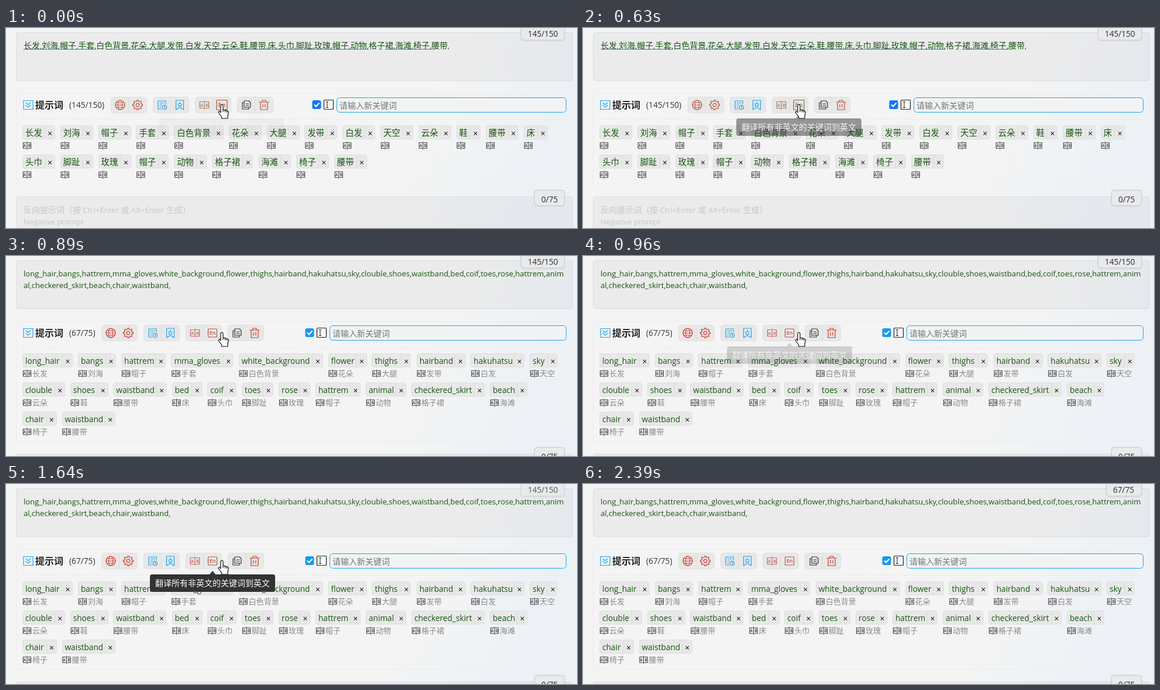
An HTML page that plays this animation: 976 by 343 pixels, repeating every 2990 ms.

```html
<!DOCTYPE html>
<html lang="zh-CN">
<head>
<meta charset="utf-8">
<title>提示词</title>
<style>
  html, body { margin: 0; width: 100%; height: 100%; overflow: hidden; background: #f4f4f4; }
  svg { display: block; width: 976px; height: 343px; }
  text { font-family: "Open Sans", "Noto Sans CJK SC", "Noto Sans CJK", sans-serif; white-space: pre; }
  .line { fill: none; stroke: currentColor; stroke-width: 1.2; stroke-linecap: round; stroke-linejoin: round; }
  .panel { fill: #000; fill-opacity: .037; stroke: #000; stroke-opacity: .075; }
  .box { fill: #e8e8e8; stroke: #dfdfdf; }
</style>
</head>
<body>
<svg id="stage" viewBox="0 0 976 343" xmlns="http://www.w3.org/2000/svg"></svg>
<script>
const LOOP = 2990;
const STEPS = [0, 70, 140, 210, 350, 550, 620, 690, 750, 890, 960, 1030, 1100, 1170, 1240,
  1640, 1710, 1780, 1850, 1920, 1990, 2070, 2320, 2390];
const GREEN = '#17550f', BLUE = '#1fa3ee';

const zhRows = [
  '长发 刘海 帽子 手套 白色背景 花朵 大腿 发带 白发 天空 云朵 鞋 腰带 床',
  '头巾 脚趾 玫瑰 帽子 动物 格子裙 海滩 椅子 腰带'
].map(r => r.split(' '));
const zh = zhRows.flat();
const enRows = [
  'long_hair bangs hattrem mma_gloves white_background flower thighs hairband hakuhatsu sky',
  'clouble shoes waistband bed coif toes rose hattrem animal checkered_skirt beach',
  'chair waistband'
].map(r => r.split(' '));
const chipWidths = [
  [84.9, 64.2, 75.3, 105.3, 142.9, 64.8, 66.3, 82.6, 90.9, 47],
  [71.7, 63.6, 90.2, 50.8, 48.8, 53, 52.9, 76, 68, 124, 63],
  [57.5, 90.2]
];

// Latin runs get their own size next to the CJK glyphs.
const text = (x, y, s, fill, size = 14, latin = size, extra = '') =>
  `<text x="${x}" y="${y}" fill="${fill}" font-size="${size}" ${extra}>` +
  s.replace(/[ -~]+/g, m => `<tspan font-size="${latin}">${m}</tspan>`) + '</text>';
const rect = (x, y, w, h, r, attrs) =>
  `<rect x="${x}" y="${y}" width="${w}" height="${h}" rx="${r}" ${attrs}/>`;
const icon = (x, y, color, body, scale = 1) =>
  `<g transform="translate(${x} ${y}) scale(${scale})" color="${color}" class="line">${body}</g>`;
const path = (d, attrs = '') => `<path d="${d}" ${attrs}/>`;
const letters = (x, y, s, size) =>
  `<text x="${x}" y="${y}" font-size="${size}" font-weight="600" text-anchor="middle" fill="currentColor" stroke="none">${s}</text>`;

const abBody = path('M-1.8-5.5H-7.7V5.5H-1.8M1.8-5.5H7.7V5.5H1.8M0-7.5V7.5') +
  letters(-4.4, 2.8, 'A', 7.5) + letters(4.4, 2.8, 'B', 7.5);
const enBody = rect(-7.5, -7, 15, 14, 1, '') + letters(0, 3.3, 'En', 9);
const globe = '<circle r="8"/><g stroke-width=".9"><ellipse rx="3.6" ry="8"/>' +
  path('M-8 0H8M-7-4H7M-7 4H7') + '</g>';
const history = path('M6-2V-7H-7V7H-1M-4-3.5H3M-4 0H0M-4 3.5H-2') +
  '<circle cx="4" cy="4" r="3.7"/>' + path('M4 2V4.3L5.7 5');
const star = path('M-6.5-8H6.5V8L0 4-6.5 8Z') +
  path('M0-4.5L1.2-2 3.8-1.7 1.9.1 2.4 2.7 0 1.4-2.4 2.7-1.9.1-3.8-1.7-1.2-2Z', 'stroke-width="1"');
const copy = path('M-4-7H4L7-4V4H-4ZM-4-4H-7V7H4V4M-1-2H4M-1 1H4');
const trash = path('M-8-5H8M-3-5V-8H3V-5M-6-5V8H6V-5M-2-1V4M2-1V4');

function gear() {
  let d = '';
  for (let i = 0; i < 32; i++) {
    const a = (i - .5) * Math.PI / 16, r = i % 4 < 2 ? 8.5 : 6.3;
    d += (i ? 'L' : 'M') + (r * Math.cos(a)).toFixed(2) + ' ' + (r * Math.sin(a)).toFixed(2);
  }
  return path(d + 'Z') + '<circle r="2.8"/>';
}

function chip(x, y, w, label, size) {
  const r = x + w;
  return rect(Math.round(x) + .5, y - .5, Math.round(w), 23, 3.5, 'class="box"') +
    path(`M${Math.round(r - 17) + .5} ${y}v22`, 'stroke="#dcdcdc"') +
    text(x + 5, y + 17, label, GREEN, size) +
    text(r - 7.5, y + 18, '×', '#111', 14, 14, 'text-anchor="middle"') +
    icon(x + 8, y + 33.5, '#333', abBody, .86);
}

function zhChips() {
  return zhRows.map((row, i) => {
    let x = 28;
    return row.map(word => {
      const w = word.length * 14.4 + 26, out = chip(x, 168 + i * 50, w, word, 14.4);
      x += w + 10;
      return out;
    }).join('');
  }).join('');
}

function enChips() {
  let n = 0;
  return enRows.map((row, i) => {
    let x = 28;
    return row.map((word, j) => {
      const w = chipWidths[i][j], y = 168 + i * 50;
      const out = chip(x, y, w, word, 13.65) + text(x + 17, y + 37.5, zh[n++], '#8a8a8a', 13);
      x += w + 10;
      return out;
    }).join('');
  }).join('');
}

function badge(x, y, s) {
  return rect(x - 1, y - 1, 957 - x, 30, 6, 'fill="#c9cccf" opacity=".45"') +
    rect(x + .5, y + .5, 954 - x, 26, 5, 'fill="#e9eaeb" stroke="#cfd1d3"') +
    text(x + 12, y + 21, s, '#2b2b2b', 13.6);
}

function toolbar(red, ab, en) {
  let out = '';
  for (let x = 179; x < 400; x += 72)
    out += rect(x + .5, 118.5, 61, 27, 5, 'class="box"') + path(`M${x + 30.5} 119v26`, 'stroke="#dedede"');
  return out + icon(195, 132, red, globe) + icon(225, 132, red, gear()) +
    icon(267, 132, BLUE, history) + icon(297, 132, BLUE, star) +
    icon(339, 132, ab, abBody) + en +
    icon(411, 132, '#333', copy) + icon(441, 132, red, trash);
}

function inputRow(x, blue) {
  return rect(x - .5, 124, 15, 15, 3, `fill="${blue}"`) +
    path(`M${x + 3} 131.5l3 3 5.5-6`, 'fill="none" stroke="#fff" stroke-width="2"') +
    rect(x + 19.5, 123.5, 16, 16, 1, 'fill="#f6f6f6" stroke="#222" stroke-width="1.2"') +
    path(`M${x + 23} 126.5h4M${x + 23} 136.5h4M${x + 25} 126v11`, 'stroke="#222"') +
    rect(x + 41.5, 119.5, 916 - x, 25, 5, `fill="#f1f3f4" stroke="${BLUE}"`) +
    text(x + 46, 137.5, '请输入新关键词', '#757575');
}

const section = h => rect(17.5, 112.5, 951, h, 1, 'fill="none" stroke="#ebebeb"');
const negative = dy => `<g transform="translate(0 ${dy})">` +
  rect(17.5, 289.5, 951, 90, 4, 'class="panel"') +
  text(30, 317, '反向提示词（按 Ctrl+Enter 或 Alt+Enter 生成）', '#c6c6c6', 14, 13.1) +
  text(30, 337, 'Negative prompt', '#c6c6c6', 13.1) + badge(903, 278, '0/75') + '</g>';

const before = `<g id="before">` +
  text(30, 35, zh.join(',') + ',', GREEN, 14, 12.4) +
  path('M30 36.5H154M182 36.5H620M648 36.5H727', 'stroke="#3d6fe0"') +
  section(155) + text(108, 137, '(145/150)', '#333', 13.7) +
  toolbar('#ba5133', '#a37b5c', `<g id="hover">${icon(369, 132, 'currentColor', enBody, 1.2)}</g>`) +
  inputRow(524, '#1677f5') + zhChips() + negative(0) + '</g>';

const prompt = enRows.flat().join(',') + ',';
const cut = prompt.indexOf('animal') + 4;
const after = `<g id="after">` +
  text(30, 35, prompt.slice(0, cut), GREEN, 13.1) + text(30, 55, prompt.slice(cut), GREEN, 13.1) +
  section(205) + text(108, 137, '(67/75)', '#333', 13.7) +
  `<g transform="translate(-16)">${toolbar('#cf3527', '#c4655a', icon(369, 132, '#b3583c', enBody))}</g>` +
  inputRow(512, '#1c98ee') + enChips() + negative(50) + '</g>';

document.getElementById('stage').innerHTML =
  `<defs><linearGradient id="tint" x1="0" x2="1" y1="0" y2=".15">
    <stop offset=".78" stop-color="#e2eefa" stop-opacity="0"/>
    <stop offset="1" stop-color="#e2eefa" stop-opacity=".4"/></linearGradient></defs>` +
  rect(0, 0, 976, 343, 0, 'fill="#f4f4f4"') +
  rect(0, 0, 976, 343, 0, 'fill="url(#tint)"') +
  rect(17.5, 7.5, 951, 83, 4, 'class="panel"') +
  path('M28 156.5H958', 'stroke="#e6e6e6" stroke-dasharray="3 2"') +
  icon(38, 132, BLUE, rect(-8, -7.5, 16, 15, 0, '') + path('M-4-4L0-.5 4-4M-4 .5L0 4 4 .5')) +
  text(50, 138, '提示词', '#222', 16, 16, 'font-weight="700"') +
  before + after +
  `<g id="oldCount">${badge(880, -6, '145/150')}</g><g id="newCount">${badge(894, -6, '67/75')}</g>` +
  `<g id="tip">${path('M363 156L369 149 375 156Z', 'fill="#333"')}${rect(262, 155, 214, 30, 4, 'fill="#333"')}` +
  text(271, 175, '翻译所有非英文的关键词到英文', '#fff') + '</g>' +
  `<g id="cursor" fill="#fff" stroke="#111" stroke-width="1.2" stroke-linejoin="round">` +
  path('M-2 2C-2-.5 2-.5 2 2V9L5.5 9.7 9.5 11C11 11.6 11.5 12.6 11.3 14L10 20V24H-.5V21L-5.5 14.5C-6.5 12.5-4.5 11-3 12.8L-2 14Z') +
  path('M2 9v4M5.5 10v3.5M8.5 11v3', 'fill="none"') + '</g>';

const [oldPage, newPage, hover, oldCount, newCount, tip, cursor] =
  ['before', 'after', 'hover', 'oldCount', 'newCount', 'tip', 'cursor'].map(id => document.getElementById(id));

// CSS "ease": cubic-bezier(.25, .1, .25, 1), solved by bisection.
function ease(p) {
  if (p <= 0) return 0;
  if (p >= 1) return 1;
  const curve = (a, b, u) => 3 * a * u * (1 - u) ** 2 + 3 * b * u * u * (1 - u) + u ** 3;
  let lo = 0, hi = 1;
  for (let i = 0; i < 20; i++) {
    const mid = (lo + hi) / 2;
    if (curve(.25, .25, mid) < p) lo = mid; else hi = mid;
  }
  return curve(.1, 1, lo);
}
const show = (el, on) => el.setAttribute('display', on ? 'inline' : 'none');

function draw(t) {
  const translated = t >= 890, counted = t >= 2320;
  const fade = (start, dur = 300) => ease((t - start) / dur);
  show(oldPage, !translated);
  show(newPage, translated);
  show(oldCount, !counted);
  show(newCount, counted);
  hover.setAttribute('color', t < 550 ? '#b4694c' : '#8f7b58');

  tip.setAttribute('opacity', translated ? fade(915) - fade(1764) : fade(-15) - fade(530));
  tip.setAttribute('transform', `translate(${translated ? -16 : 0})`);
  oldCount.setAttribute('opacity', 1 - .8 * fade(1610, 150));
  newCount.setAttribute('opacity', .2 + .8 * fade(2250, 140));

  const away = Math.max(0, (t - 1640) / 210);
  show(cursor, away < 1);
  cursor.setAttribute('transform', `translate(${369 + 80 * away} ${131 + 212 * away ** 1.3})`);
}

const start = performance.now();
function tick() {
  const t = (performance.now() - start) % LOOP;
  draw(STEPS.findLast(s => s <= t));
  requestAnimationFrame(tick);
}
tick();
</script>
</body>
</html>
```
